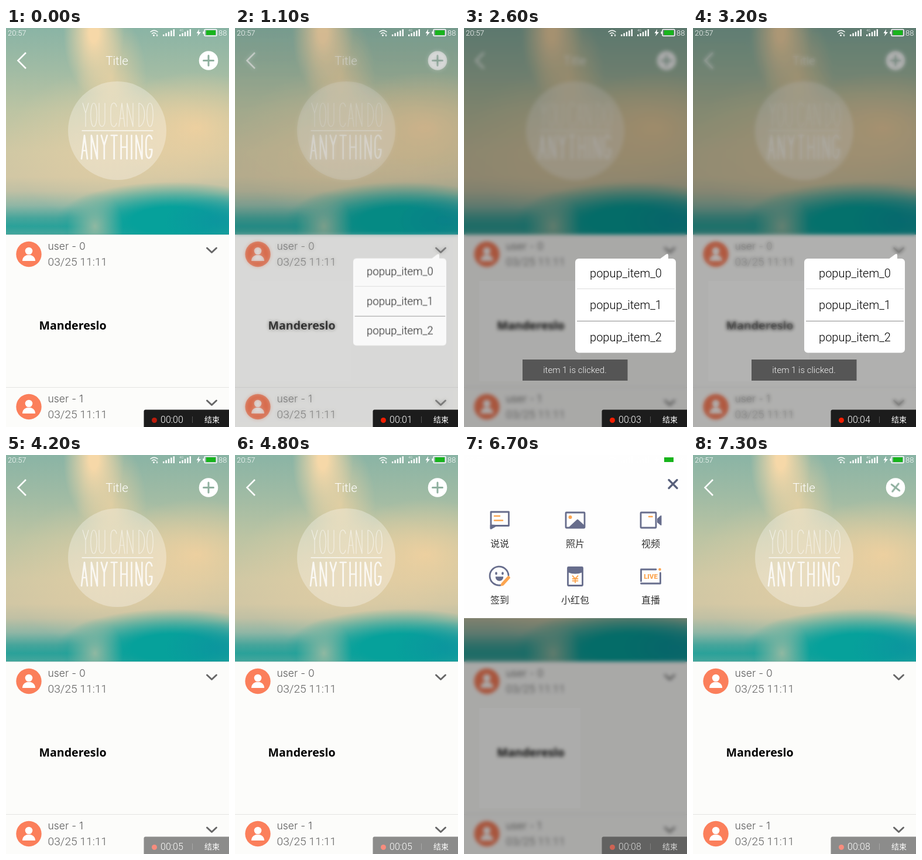
An HTML page for the animation above (7400 ms loop, 381 px wide and 680 px high).

```html
<!DOCTYPE html>
<html lang="zh">
<head>
<meta charset="utf-8">
<title>Blur popup</title>
<style>
html, body { margin: 0; width: 100%; height: 100%; overflow: hidden; background: #fcfcfa; }
#stage { position: relative; width: 381px; height: 680px; overflow: hidden; }
#stage > * { position: absolute; left: 0; top: 0; }
svg { display: block; font-family: Roboto, sans-serif; font-weight: 300; }
.cjk { font-family: "Noto Sans CJK SC", "Noto Sans CJK", sans-serif; font-weight: 400; }
.mid { text-anchor: middle; }
.line { fill: none; stroke-linecap: round; stroke-linejoin: round; }

#sky {
  width: 381px; height: 352px;
  background:
    radial-gradient(48px 62px at 152px 338px, #8fb8a2, #8fb8a200),
    radial-gradient(90px 45px at 360px 328px, #0f8fa099, #0f8fa000),
    radial-gradient(200px 66px at 285px 328px, #06a19b 35%, #06a19b00),
    radial-gradient(52px 105px at 150px 8px, #f6d8a8 15%, #f6d8a800),
    radial-gradient(60px 110px at 180px 85px, #f0d3a2bb, #f0d3a200),
    radial-gradient(150px 95px at 325px 170px, #f2d19fdd, #f0d09c00),
    radial-gradient(180px 130px at 180px 200px, #e8d0a4aa, #e8d0a400),
    linear-gradient(#8ab4a5, #a0bba4 20%, #bcc4a3 40%, #d0c8a4 60%, #d2c7a4 72%,
      #c0c0a4 79%, #8fb6a5 86%, #46a59b 92%, #2aa199 96%, #45a69c);
}

/* The second layer is the faint picture card seen through the blur */
#dim {
  width: 381px; height: 680px; opacity: 0;
  background: linear-gradient(#ffffff0a 0 0) 26px 431px / 173px 171px no-repeat, rgba(0, 0, 0, .33);
  backdrop-filter: blur(3.4px);
  animation: dim 7.4s linear infinite;
}
@keyframes dim {
  0%, 11.5% { opacity: 0; }
  19.5%, 42.4% { opacity: 1; }
  53.5%, 77% { opacity: 0; }
  85.2%, 91.4% { opacity: 1; }
  97.8%, 100% { opacity: 0; }
}

#popup { transform-origin: 348px 386px; animation: popup 7.4s ease-out infinite; }
@keyframes popup {
  0%, 11.5% { opacity: 0; transform: scale(.5); }
  16.5%, 44.6% { opacity: 1; transform: none; }
  48.5%, 100% { opacity: 0; transform: scale(.5); }
}

#touch { animation: touch 7.4s linear infinite; }
@keyframes touch {
  0%, 25.5% { opacity: 0; }
  25.6%, 27.5% { opacity: 1; }
  30%, 100% { opacity: 0; }
}

#toast { animation: toast 7.4s linear infinite; }
@keyframes toast {
  0%, 29.5% { opacity: 0; }
  33%, 52.7% { opacity: 1; }
  56.6%, 100% { opacity: 0; }
}

#panel { animation: panel 7.4s infinite; }
@keyframes panel {
  0%, 77% { transform: translateY(-280px); animation-timing-function: ease-out; }
  85.5%, 91.2% { transform: none; animation-timing-function: ease-in; }
  97.3%, 100% { transform: translateY(-280px); }
}

#plus { transform-origin: 346px 55.5px; animation: plus 7.4s linear infinite; }
@keyframes plus {
  0%, 77% { transform: none; }
  83%, 97.5% { transform: rotate(45deg); }
  100% { transform: rotate(30deg); }
}

#recorder { animation: recorder 7.4s linear infinite; }
@keyframes recorder {
  0%, 48% { opacity: 1; }
  51%, 100% { opacity: .5; }
}
#dot { fill: #f21d00; animation: dot 7.4s linear infinite; }
@keyframes dot { 0% { fill: #bd1c0c; } 7%, 100% { fill: #f21d00; } }
</style>
</head>
<body>
<div id="stage">
  <div id="sky"></div>

  <svg id="page" width="381" height="680">
    <defs>
      <g id="row">
        <circle cx="39" cy="385.500" r="21.700" fill="#fb7f5b"/>
        <circle cx="39" cy="380" r="6.300" fill="#fff"/>
        <path d="M28 397C28 391 32 388 36 387H42C46 388 50 391 50 397Z" fill="#fff"/>
        <path class="line" d="M343.500 375L351.500 382.500L359.500 375" stroke="#666" stroke-width="3"/>
        <text x="71.500" y="405" font-size="19.200" fill="#5c5c5c">03/25 11:11</text>
      </g>
    </defs>
    <circle cx="190" cy="175" r="84" fill="#fff" opacity=".3"/>
    <g id="art" class="line" stroke="#fff">
      <path d="M130 175H251" stroke-width="1.300" opacity=".8"/>
    </g>
    <path d="M34 42L20.500 55.500L34 69" fill="none" stroke="#fff" stroke-width="2.600"/>
    <text class="mid" x="189.500" y="63" font-size="20.500" fill="#fff">Title</text>
    <circle cx="346" cy="55.500" r="16.300" fill="#fff"/>
    <path id="plus" class="line" d="M337.500 55.500H354.500M346 47V64" stroke="#8fb09f" stroke-width="3"/>

    <rect y="352" width="381" height="328" fill="#fcfcfa"/>
    <path d="M0 352.500H381M0 612.500H381" stroke="#e4e4e2"/>
    <use href="#row"/>
    <use href="#row" y="260"/>
    <g font-size="17.500" font-family="Inter, sans-serif" fill="#5c5c5c">
      <text x="71.500" y="377.500">user - 0</text>
      <text x="71.500" y="637.500">user - 1</text>
    </g>
    <text x="56.500" y="514" font-size="19.600" font-weight="700" font-family="Open Sans, sans-serif">Mandereslo</text>
  </svg>

  <div id="dim"></div>

  <svg id="popup" width="381" height="680">
    <path d="M334 394L345 386Q349 383 349 388V394Z" fill="#fff"/>
    <rect x="190" y="393" width="172" height="160.500" rx="6" fill="#fff"/>
    <path d="M193 444.500H360" stroke="#ddd"/>
    <path d="M193 499.500H360" stroke="#8c8c8c"/>
    <g class="mid" font-size="20" fill="#000">
      <text x="276.500" y="424.500">popup_item_0</text>
      <text x="276.500" y="479">popup_item_1</text>
      <text x="276.500" y="533.500">popup_item_2</text>
    </g>
    <circle id="touch" cx="282.500" cy="478.500" r="12" fill="#fff" fill-opacity=".6" stroke="#c6c2ea" stroke-width="1.500"/>
  </svg>

  <svg id="panel" width="381" height="280">
    <rect width="381" height="278" fill="#fefefe"/>
    <g class="line" stroke="#676d8c" stroke-width="2.800">
      <path d="M350 42.500L364 56.500M364 42.500L350 56.500" stroke="#59617c" stroke-width="3.400"/>
      <path d="M46 97H76.500V120.500H54L46 125Z"/>
      <path d="M46 120V125L54 120.500Z" fill="#676d8c"/>
      <rect x="174" y="98" width="32" height="26" rx="1"/>
      <path d="M181 123L194 111L205 121V123Z" fill="#676d8c"/>
      <rect x="302" y="98" width="26" height="26" rx="1"/>
      <path d="M331 109L336.500 104V119L331 114.500Z" fill="#676d8c" stroke-width="2"/>
      <path d="M76 205A16 16 0 1 0 62 222"/>
      <path d="M54.500 208H66.500C66 216 55 216 54.500 208Z" fill="#676d8c" stroke-width="1.500"/>
      <path d="M55 201V202.500M66 201V202.500" stroke-width="3.500"/>
      <rect x="177.500" y="191.500" width="25" height="31" rx="1"/>
      <path d="M178 192H202V199Q190 204 178 199Z" fill="#676d8c" stroke-width="2"/>
      <path d="M328 195H302.500V215M302.500 219H335.500V201"/>
    </g>
    <g class="line" stroke="#fca550" stroke-width="2.600">
      <path d="M52 104H61M52 111.500H66M316 105H321.500"/>
      <path d="M66 220L76 209" stroke-width="5.500"/>
      <path d="M63.500 222.500L66 218" stroke-width="2"/>
      <path d="M185.500 206L190 211L194.500 206M190 211V217.500M185.500 211H194.500M185.500 214.500H194.500" stroke-width="1.900"/>
    </g>
    <g fill="#fca550">
      <circle cx="181.500" cy="106" r="3"/>
      <circle cx="334.500" cy="195" r="2.300"/>
      <text class="mid" x="319" y="211.200" font-size="11.500" font-weight="900">LIVE</text>
    </g>
    <g class="cjk mid" font-size="16" fill="#333">
      <text x="61" y="157">说说</text>
      <text x="190" y="157">照片</text>
      <text x="319" y="157">视频</text>
      <text x="61" y="252.500">签到</text>
      <text x="190" y="252.500">小红包</text>
      <text x="319" y="252.500">直播</text>
    </g>
  </svg>

  <svg id="status" width="381" height="18" fill="#fff" font-size="13" font-weight="400">
    <text x="3" y="13">20:57</text>
    <text x="363" y="13">88</text>
    <path class="line" d="M247 6.500Q253 2 259 6.500M249.500 9.500Q253 7 256 9.500" stroke="#fff" stroke-width="1.500"/>
    <circle cx="252.500" cy="12.500" r="1.500"/>
    <path d="M258 10V14M256.500 12.500L258 14L259.500 12.500" fill="none" stroke="#fff"/>
    <g id="bars"></g>
    <text x="296" y="6" font-size="6">4G</text>
    <path d="M330 2L325.500 9H328.500L327 14L333 7H329.500Z"/>
    <rect x="339" y="2.500" width="21" height="11" rx="1.500" fill="none" stroke="#fff" stroke-width="1.500"/>
    <rect x="336.500" y="6" width="2" height="4"/>
    <rect x="342" y="4" width="16" height="8" fill="#18b41c"/>
  </svg>

  <svg id="toast" width="381" height="680">
    <rect x="100" y="565" width="179.500" height="36" fill="#535353" opacity=".97"/>
    <text class="mid" x="189.500" y="588" font-size="15" fill="#f2f2f2">item 1 is clicked.</text>
  </svg>

  <svg id="recorder" width="381" height="680" fill="#fff">
    <path d="M235.500 680V653.500Q235.500 650.500 238.500 650.500H381V680Z" fill="#1c1c1c"/>
    <circle id="dot" cx="253.500" cy="668.500" r="4.500"/>
    <text id="clock" x="264" y="673" font-size="16">00:00</text>
    <path d="M318.500 662V673" stroke="#555"/>
    <text class="cjk" x="339" y="672" font-size="13">结束</text>
  </svg>
</div>

<script>
const $ = id => document.getElementById(id);
const LOOP = 7400;

function add(parent, tag, attrs) {
  const el = document.createElementNS("http://www.w3.org/2000/svg", tag);
  for (const k in attrs) el.setAttribute(k, attrs[k]);
  parent.append(el);
}

// Tall hand lettering, each letter in a 10 by 40 cell
const strokes = {
  Y: "M0 0L5 17M10 0L5 17V40",
  O: "M5 0C-2 0-2 40 5 40S12 0 5 0Z",
  U: "M0 0V30C0 43 10 43 10 30V0",
  C: "M10 6C8-3 0-3 0 12V28C0 43 8 43 10 34",
  A: "M0 40L5 0L10 40M2 26H8",
  N: "M0 40V0L10 40V0",
  D: "M0 0V40C13 38 13 2 0 0Z",
  T: "M0 0H10M5 0V40",
  H: "M0 0V40M10 0V40M0 20H10",
  I: "M1 0V40",
  G: "M10 6C8-3 0-3 0 12V28C0 43 10 43 10 24H6"
};

function letter(words, x, y, advance, weight, opacity) {
  for (const c of words) {
    if (c === " ") { x += 6; continue; }
    add($("art"), "path", {
      d: strokes[c], transform: `translate(${x} ${y})`, "stroke-width": weight, opacity
    });
    x += c === "I" ? advance - 8 : advance;
  }
}
letter("YOU CAN DO", 131, 128, 14, 1.2, 0.55);
letter("ANYTHING", 129, 183, 16.9, 2.7, 0.8);

for (const x of [268, 296])
  for (let i = 0; i < 5; i++) {
    const h = 3 + i * 2.2;
    add($("bars"), "rect", { x: x + i * 4.4, y: 14 - h, width: 2.4, height: h });
  }

// The recorder's clock runs slightly faster than the loop
const master = $("dim").getAnimations()[0];
function tick() {
  const t = (master ? master.currentTime : performance.now()) % LOOP;
  const text = "00:0" + Math.floor(0.66 + t * 0.0011);
  if ($("clock").textContent !== text) $("clock").textContent = text;
  requestAnimationFrame(tick);
}
tick();
</script>
</body>
</html>
```
